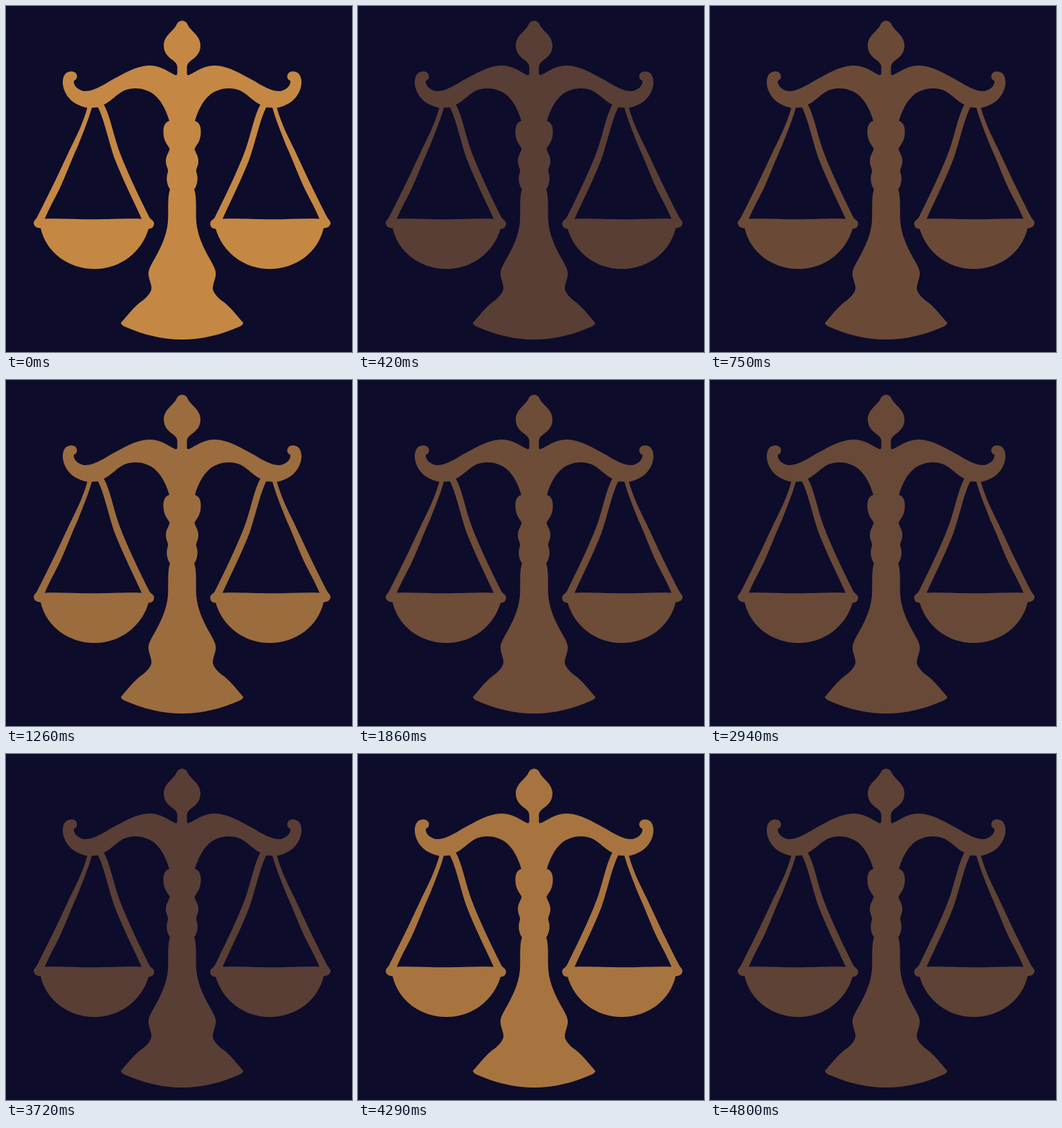
These frames come from a looping animation (500 px wide and 500 px high, 5.01 s). An HTML page:

```html
<!DOCTYPE html>
<html lang="en">
<head>
<meta charset="utf-8">
<title>Pulsing scales</title>
<style>
  html, body { margin: 0; width: 100%; height: 100%; overflow: hidden; background: #0e0c2b; }
  svg { display: block; width: 100vw; height: 100vh; }
</style>
</head>
<body>
<svg viewBox="0 0 500 500">
  <g id="scales" fill="#c48844">
    <path id="half" fill-rule="evenodd" d="
      M255.5 21.5 H254.5 C250 21.5 247.5 24 246 28 C241 37 228 43 228 57
      C228 70 237 75 243 80 C247 83 248 87 247.5 92 C247.5 97 248 100 245.5 100
      C240 99 226 86 207 86 C186 87 170 98 150 108.5 C136 117 124 124 112 123
      C104 121 97 115 98 108 C105 106 104 95 95 94.5 C85 94 82 103 82 110
      C82 124 92 138 105 143 C109 145 113 146.5 117.5 147
      C112 168 101 190 92 208 C80 234 66 264 45 305 C43 309 40 310 40 314
      C41 319 45 321 50 321 C58 356 90 380 128 380 C165 380 196 356 206 322
      C211 322 214 319 214 314 C213 309 209 309 207 305
      C190 271 171 231 162 205 C154 181 150 158 141.5 142.5
      C152 138 160 127 171 122 C185 116 203 119 214 128 C225 137 232 152 236 166
      C229 168 227 175 227.5 184 C228 195 233 200 236.5 206
      C236 211 231 216 231 224 C231 232 235 235 234 240 C231 248 232 258 237 265
      C233 276 235 295 234 312 C232 333 223 350 216 363
      C209 375 205 382 206 389 C207 397 211 403 210 410
      C207 418 200 424 194 428 C183 437 174 449 166 458
      C167 461 169 462 172 463.5 C198 475 226 482 254.5 482 H255.5 Z
      M124 147 C119 165 111 184 104 202 C93 226 86 246 77 265 C70 279 62 293 56 307.5
      C80 306.5 105 308.5 128 308.3 C150 308 178 306.5 196 307.5
      C184 281 168 249 157.5 222 C148 195 142 164 133 146.5 Z"/>
    <use href="#half" transform="matrix(-1 0 0 1 509 0)"/>
  </g>
</svg>
<script>
  const LOOP = 5010, PULSE = 1100, FADE = 440, LOW = 0.38;
  const TICK = 30, MIN_CHANGE = 0.064;
  const scales = document.getElementById('scales');

  // Linear fade down, rest, linear fade up.
  function pulse(time) {
    const phase = time % PULSE;
    const fromPeak = Math.min(phase, PULSE - phase);
    return 1 - (1 - LOW) * Math.min(1, fromPeak / FADE);
  }

  // The shown opacity only follows the pulse once it has moved far enough.
  function shownOpacity(time) {
    let shown = 1;
    for (let tick = 0; tick <= time; tick += TICK) {
      const value = pulse(tick);
      if (Math.abs(value - shown) > MIN_CHANGE) shown = value;
    }
    return shown;
  }

  const start = performance.now();
  function draw() {
    scales.setAttribute('opacity', shownOpacity((performance.now() - start) % LOOP));
    requestAnimationFrame(draw);
  }
  draw();
</script>
</body>
</html>
```
